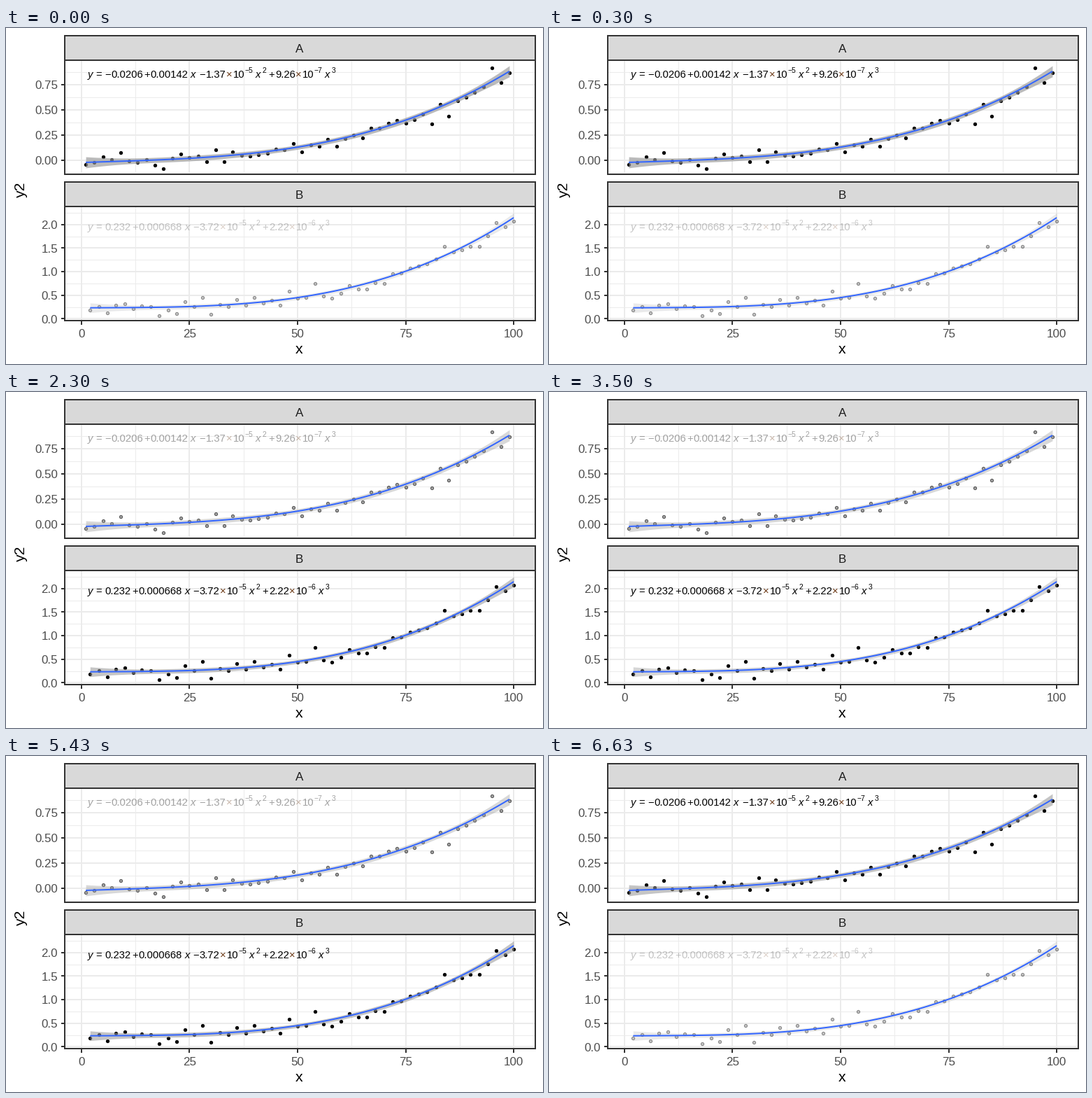
Recreate the animation shown at these times as a matplotlib script. Size 768 by 480 pixels, loop 6750 ms.

```python
import numpy as np
import matplotlib.pyplot as plt
from matplotlib.animation import FuncAnimation
from matplotlib.patches import Rectangle

W, H, DPI = 768, 480, 100
PX = 72 / DPI                     # points per pixel
STEP, FRAMES = 125, 54
LEFT, RIGHT = 84, 757
DARK, GRID, TICK = "#333333", "#EBEBEB", "#4D4D4D"
BLUE, BAND, TIMES = "#3366FF", "#999999", (0.42, 0.22, 0.08)

plt.rcParams["font.family"] = "Liberation Sans"
fig = plt.figure(figsize=(W / DPI, H / DPI), dpi=DPI, facecolor="white")
ax = fig.add_axes([0, 0, 1, 1])
ax.set_xlim(0, W)
ax.set_ylim(H, 0)
ax.axis("off")


def x_px(v):
    return 107.9 + 6.182 * np.asarray(v, float)


def line(x, y, color=DARK, width=2.0, z=1):
    ax.plot(x, y, color=color, lw=width * PX, zorder=z,
            solid_capstyle="butt")


def box(top, bottom, fill):
    ax.add_patch(Rectangle((LEFT, top), RIGHT - LEFT, bottom - top, fc=fill,
                           ec=DARK, lw=2 * PX, zorder=6, joinstyle="miter"))


def label(x, y, s, size, color="black", ha="left", **kw):
    return ax.text(x, y, s, fontsize=size * PX, color=color, ha=ha,
                   va="baseline", zorder=8, **kw)


def equation(y, coefs, powers):
    """Write the cubic from left to right; returns its text artists."""
    big, small, digit = 14.7, 10.3, 0.556
    parts = []
    x = 117

    def put(s, gap, size=big, up=0, **kw):
        nonlocal x
        parts.append(label(x, y - up, s, size, **kw))
        wide = sum({".": 0.278, "x": 0.5, "y": 0.5}.get(
            c, 0.584 if c in "=+\u2212\u00d7" else digit) for c in s)
        x += wide * size + gap

    put("y", 3.6, style="italic")
    put("=", 4.4)
    if coefs[0][0] == "\u2212":
        put("\u2212", 0.4)
        put(coefs[0][1:], 2.2)
    else:
        put(coefs[0], 2.2)
    put("+", 0.9)
    put(coefs[1], 4.4)
    put("x", 4.4, style="italic")
    for n, sign in enumerate("\u2212+"):
        put(sign, 1.2)
        put(coefs[2 + n], 1)
        put("\u00d7", 1.4, color=TIMES)
        put("10", 0, small * 0 + big)
        put("\u2212" + powers[n], 3.6, small, 7)
        put("x", 2.6, style="italic")
        put(str(n + 2), 2.4, small, 7)
    return parts


class Panel:
    def __init__(self, name, top, zero, unit, ticks, minor, fmt):
        self.zero, self.unit = zero, unit
        head, bottom = top + 35, top + 198
        box(top, head, "#D9D9D9")
        box(head, bottom, "none")
        label(419.5, top + 24, name, 17.07, "#1A1A1A", "center")

        for v in np.arange(12.5, 100, 25):
            line([x_px(v)] * 2, [head, bottom], GRID, 1)
        for v in minor:
            line([LEFT, RIGHT], [self.y_px(v)] * 2, GRID, 1)
        for v in np.arange(0, 101, 25):
            line([x_px(v)] * 2, [head, bottom], GRID, z=2)
        for v in ticks:
            y = self.y_px(v)
            line([LEFT, RIGHT], [y, y], GRID, z=2)
            line([LEFT - 5.3, LEFT], [y, y])
            label(74, y + 6.2, fmt % v, 17.07, TICK, "right")

    def y_px(self, v):
        return self.zero - self.unit * np.asarray(v, float)

    def plot(self, first, coef, sd, noise, outliers, seed, eq):
        """Scatter around the cubic, its confidence band and formula."""
        xs = np.arange(first, 101, 2)
        rng = np.random.default_rng(seed)
        ys = np.polyval(coef, xs) + rng.normal(0, noise, len(xs))
        for x, y in outliers.items():
            ys[(x - first) // 2] = y
        self.dots = ax.scatter(x_px(xs), self.y_px(ys), s=(4.3 * PX) ** 2,
                               lw=1 * PX, zorder=3)

        grid = np.linspace(xs[0], xs[-1], 80)
        fit = np.polyval(coef, grid)
        base, at = np.vander(xs / 100, 4), np.vander(grid / 100, 4)
        lever = np.sum(at @ np.linalg.inv(base.T @ base) * at, axis=1)
        half = 2.013 * sd * np.sqrt(lever)
        self.band = ax.fill_between(
            x_px(grid), self.y_px(fit - half), self.y_px(fit + half),
            color=BAND, lw=0, zorder=4)
        line(x_px(grid), self.y_px(fit), BLUE, 2, 5)
        self.eq = equation(*eq)

    def show(self, ink, shade):
        self.dots.set_facecolor((0, 0, 0, ink))
        self.dots.set_edgecolor((0, 0, 0, 1 - (1 - ink) ** 2))
        self.band.set_alpha(shade)
        for part in self.eq:
            part.set_alpha(ink)


panel_a = Panel("A", 11, 189.2, 144, np.arange(0, 0.8, 0.25),
                np.arange(-0.125, 0.9, 0.25), "%.2f")
panel_a.plot(1, [9.26e-7, -1.37e-5, 0.00142, -0.0206], 0.052, 0.03,
             {9: 0.08, 19: -0.08, 81: 0.36, 85: 0.44, 95: 0.92, 97: 0.77}, 4,
             (71, ["\u22120.0206", "0.00142", "1.37", "9.26"], "57"))

panel_b = Panel("B", 220, 415.4, 67.28, np.arange(0, 2.1, 0.5),
                np.arange(0.25, 2.3, 0.5), "%.1f")
panel_b.plot(2, [2.22e-6, -3.72e-5, 0.000668, 0.232], 0.097, 0.07,
             {18: 0.07, 30: 0.1, 54: 0.75, 58: 0.43, 84: 1.54, 92: 1.54}, 9,
             (289, ["0.232", "0.000668", "3.72", "2.22"], "56"))

for v in range(0, 101, 25):
    line([x_px(v)] * 2, [418, 423.5])
    label(x_px(v), 442, str(v), 17.07, TICK, "center")
label(419.5, 465, "x", 21.33, ha="center")
label(27, 230.5, "y2", 21.33, ha="center", rotation=90,
      rotation_mode="anchor")

# start ms, then (ink, band shade) of each panel
STATES = [
    (0, (1, 0.66), (0.23, 0.2)),
    (500, (0.36, 0.38), (1, 0.56)),
    (3500, (0.36, 0.38), (1, 0.4)),
    (3625, (0.36, 0.38), (1, 0.56)),
    (6625, (1, 0.57), (0.23, 0.2)),
]


def draw(i):
    _, a, b = [s for s in STATES if s[0] <= i * STEP][-1]
    panel_a.show(*a)
    panel_b.show(*b)
    return []


anim = FuncAnimation(fig, draw, frames=FRAMES, interval=STEP,
                     init_func=lambda: draw(0), repeat=True, repeat_delay=0)
plt.show()
```
